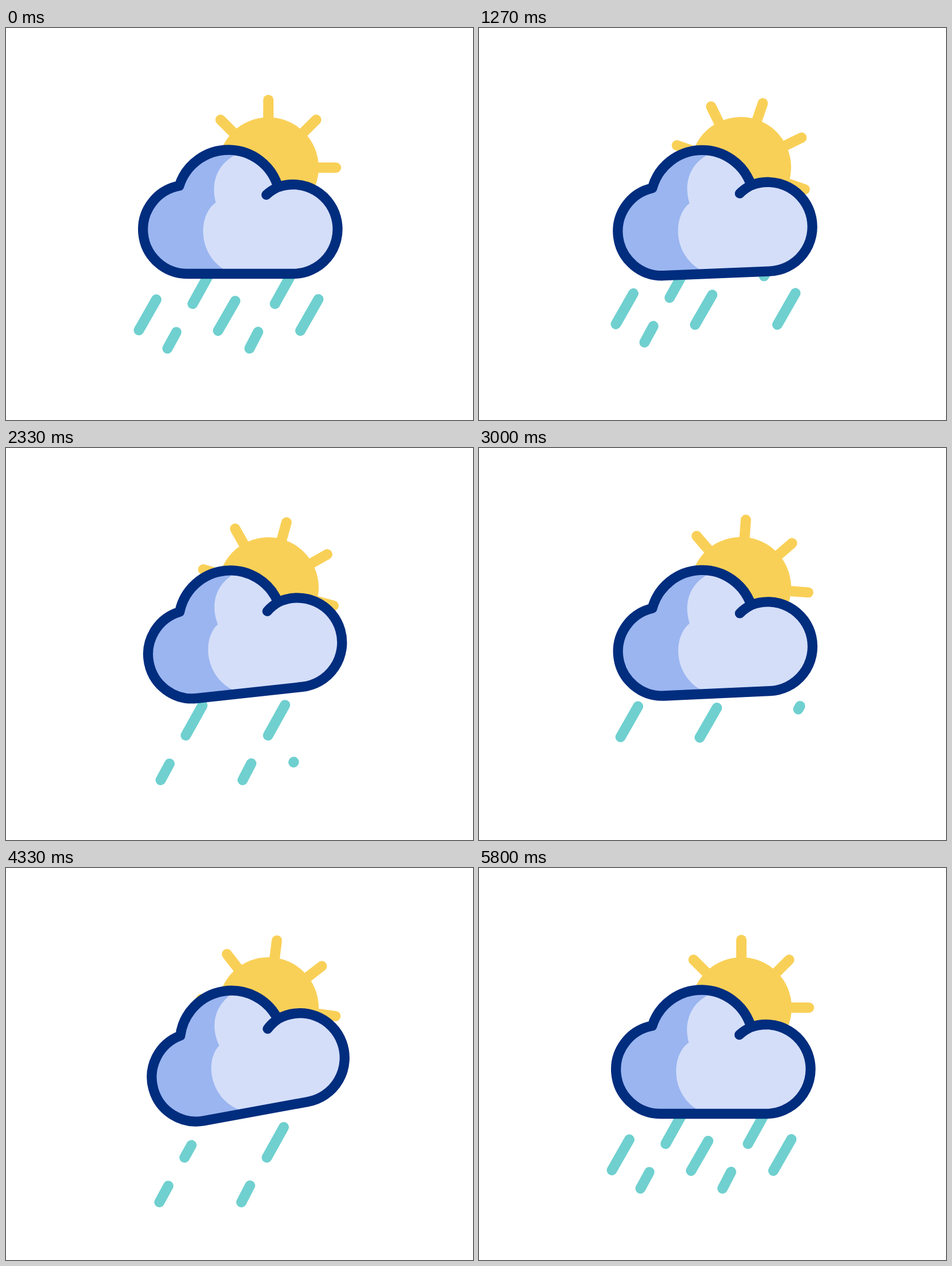
An HTML page for the animation above (5860 ms loop, 817x685 px).

```html
<!DOCTYPE html>
<html lang="en">
<head>
<meta charset="utf-8">
<title>Sun and showers</title>
<style>
  html, body { margin: 0; width: 100%; height: 100%; overflow: hidden; background: #fff; }
  svg { display: block; width: 100%; height: 100%; }
</style>
</head>
<body>
<svg viewBox="0 0 817 685">
  <defs>
    <clipPath id="inside">
      <path d="M303 275.8A90.5 90.5 0 0 1 476 278A78 78 0 1 1 502 429.5H317A77.5 77.5 0 0 1 303 275.8Z"/>
    </clipPath>
  </defs>
  <g id="sun" fill="#f9d057" stroke="#f9d057" stroke-width="18" stroke-linecap="round">
    <circle cx="459" cy="244" r="88" stroke="none"/>
  </g>
  <g id="rain" stroke="#6fd0cf" stroke-width="18" stroke-linecap="round"></g>
  <g id="cloud">
    <g clip-path="url(#inside)">
      <rect x="230" y="200" width="360" height="240" fill="#9ab5f0"/>
      <path d="M403 221C368 238 358 272 367 305C338 325 333 390 380 421V440H600V200H403Z" fill="#d4def9"/>
    </g>
    <path d="M455.5 291.5Q464 283.5 476 278A78 78 0 1 1 502 429.5H317A77.5 77.5 0 0 1 303 275.8A90.5 90.5 0 0 1 476 278"
      fill="none" stroke="#002d7e" stroke-width="17.3" stroke-linecap="round" stroke-linejoin="round"/>
  </g>
</svg>
<script>
const LOOP = 5860, CYCLE = 49, FALL = 46, TRIM = 1.4;
const sun = document.getElementById('sun');
const rain = document.getElementById('rain');
const cloud = document.getElementById('cloud');

function addLine(parent) {
  const line = document.createElementNS('http://www.w3.org/2000/svg', 'line');
  return parent.appendChild(line);
}

function setLine(line, x1, y1, x2, y2) {
  Object.entries({ x1, y1, x2, y2 }).forEach(([k, v]) => line.setAttribute(k, v));
}

for (let i = 0; i < 8; i++) {
  const a = i * Math.PI / 4, c = Math.cos(a), s = Math.sin(a);
  setLine(addLine(sun), 459 + 80 * c, 244 + 80 * s, 459 + 118.3 * c, 244 + 118.3 * s);
}

// Resting tail and head of each drop, in the order they leave and return
const drops = [
  [263, 474.5, 232.5, 528],
  [401, 477, 371, 529],
  [546.5, 474, 515, 529],
  [355.5, 430, 326.5, 482],
  [298, 531.5, 282.5, 560],
  [500, 429, 470.5, 482],
  [441, 531, 426, 560]
].map(ends => ({ ends, line: addLine(rain) }));

const swing = [[0, 0], [6.7, 0], [11.5, 13.3], [20.4, -6.5], [27, 3.1], [39, 0], [CYCLE, 0]];

const clamp = v => Math.min(1, Math.max(0, v));
const ease = (p, from, to) => (1 - Math.cos(Math.PI * clamp((p - from) / (to - from)))) / 2;

function tilt(p) {
  const i = swing.findIndex(([end], k) => k > 0 && p <= end);
  const [p0, a0] = swing[i - 1], [p1, a1] = swing[i];
  return a0 + (a1 - a0) * ease(p, p0, p1);
}

function drawDrop({ ends: [x1, y1, x2, y2], line }, i, p) {
  const leaving = p < 17;
  const dy = leaving ? FALL * ease(p, 0, 19.5) : FALL * (ease(p, 12.2, 39.8) - 1);
  const dx = dy * (leaving ? -0.59 : -0.66);
  const q = (p - (leaving ? 4.5 + 1.56 * i : 22.7 + 1.58 * i)) / TRIM;
  line.style.display = (leaving ? q < 1 : q > 0) ? '' : 'none';
  const tail = leaving ? clamp(q) : 0, head = leaving ? 1 : clamp(q);
  const w = x2 - x1, h = y2 - y1;
  setLine(line, x1 + w * tail + dx, y1 + h * tail + dy, x1 + w * head + dx, y1 + h * head + dy);
}

// The picture advances 15 times per 600 ms, with a longer first step
function stepAt(ms) {
  const t = ms % 600;
  const step = t < 70 ? 0 : t < 100 ? 1 : t < 130 ? 2 : 3 + Math.floor((t - 130) / 40);
  return Math.floor(ms / 600) * 15 + step;
}

function render(ms) {
  const p = stepAt(ms % LOOP) % CYCLE;
  const turn = 45 * (ease(p, 22, 42) - ease(p, 4.65, 11.9));
  const drift = ease(p, 12, 22) - ease(p, 31, 42);
  sun.setAttribute('transform', `translate(${-drift} ${-drift / 2}) rotate(${turn} 459 244)`);
  cloud.setAttribute('transform', `rotate(${-tilt(p)} 399 274)`);
  drops.forEach((drop, i) => drawDrop(drop, i, p));
}

const start = performance.now();
function tick() {
  render(performance.now() - start);
  requestAnimationFrame(tick);
}
tick();
</script>
</body>
</html>
```
